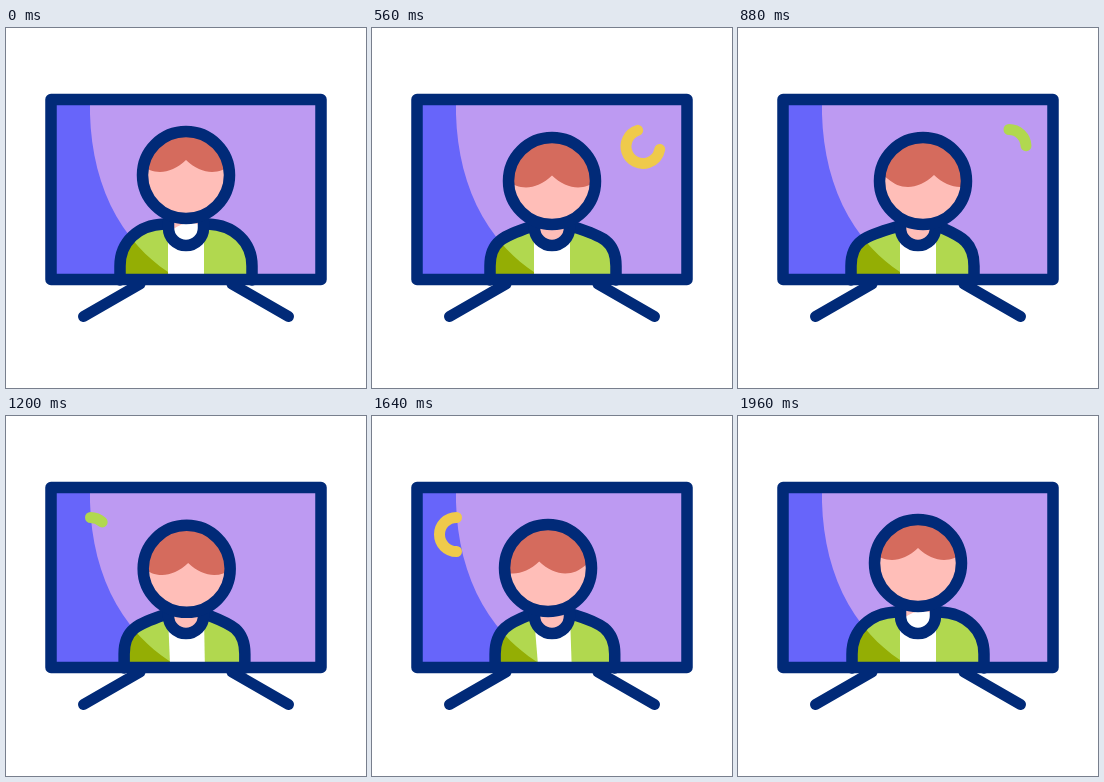
Recreate the animation shown at these times as an HTML page with a canvas. Size 360x360 px, loop 2 s.

```html
<!DOCTYPE html>
<html lang="en">
<head>
<meta charset="utf-8">
<title>Presenter on a screen</title>
<style>
html, body { margin: 0; width: 100%; height: 100%; overflow: hidden; background: #fff; }
canvas { display: block; }
</style>
</head>
<body>
<canvas id="stage" width="360" height="360"></canvas>
<script>
const ctx = document.getElementById('stage').getContext('2d');
const NAVY = '#012a78', SKIN = '#ffbeb8', HAIR = '#d56b5d';
const LIME = '#b1d84f', OLIVE = '#94ae04', YELLOW = '#efca4b';
const LOOP = 2000, STEP = 40, TAU = Math.PI * 2;

// Pose keys: rest, nod, hold, lean right, lean left, rest
const TIMES = [140, 340, 560, 880, 1560, 1920];
const KEYS = {
  headX: [180, 180, 180, 185, 175.5, 180],
  headY: [147, 153, 153, 153, 152.7, 147],
  hairX: [0, 0, 0, 11, -10, 0],
  hairY: [-15, -5.5, -5.5, -6, -5.5, -15],
  left: [114, 118, 118, 113, 124.3, 114],
  right: [246, 244, 244, 236, 242.3, 246],
  sag: [0, 1, 1, 1, 1, 0],
  shirt: [0, 0, 0, 0, 4, 0]
};

const clamp = x => Math.min(1, Math.max(0, x));
const mix = (a, b, k) => a + (b - a) * k;
const ramp = (t, from, to) => clamp((t - from) / (to - from));

function poseAt(t) {
  let i = 0;
  while (i < TIMES.length - 2 && t >= TIMES[i + 1]) i++;
  const k = (1 - Math.cos(Math.PI * ramp(t, TIMES[i], TIMES[i + 1]))) / 2;
  const pose = {};
  for (const name in KEYS) pose[name] = mix(KEYS[name][i], KEYS[name][i + 1], k);
  return pose;
}

function fill(d, color) {
  ctx.fillStyle = color;
  ctx.fill(new Path2D(d));
}

function stroke(d, color = NAVY, width = 11.5) {
  ctx.strokeStyle = color;
  ctx.lineWidth = width;
  ctx.stroke(new Path2D(d));
}

function clipped(d, draw) {
  ctx.save();
  ctx.clip(new Path2D(d));
  draw();
  ctx.restore();
}

// Ring segment between two turn fractions, starting at the top
function ring(x, start, end, dir, color) {
  if (end <= start) return;
  const angle = f => -Math.PI / 2 + dir * f * TAU;
  ctx.beginPath();
  ctx.arc(x, 118.5, 17, angle(start), angle(end), dir < 0);
  ctx.strokeStyle = color;
  ctx.lineWidth = 11;
  ctx.stroke();
}

function shoulder(edge, side, sag) {
  const inner = 180 + side * 22;
  return `M${edge} 252V238C${edge} ${214 - sag} ${edge - side * mix(18, 14, sag)} ` +
    `${mix(197, 208, sag)} ${inner} ${mix(196, 199, sag)}`;
}

const SHADE = 'M45 71H84C82 150 112 215 170 249V252H45Z';
const COLLAR = 'M162.5 194V200A17.5 17.5 0 0 0 197.5 200V194';

function drawBody(p) {
  const sides = [shoulder(p.left, -1, p.sag), shoulder(p.right, 1, p.sag)];
  const halves = sides.map(d => d + 'H180V252Z');
  for (const d of halves) fill(d, LIME);
  clipped(halves[0], () => fill(SHADE, OLIVE));
  fill(`M162 200H198L${198 + p.shirt * .5} 252H${162 + p.shirt * 1.2}Z`, '#fff');
  fill(COLLAR + 'Z', p.sag < .3 ? '#fff' : SKIN);
  if (p.sag < .3) fill('M166 190H194V197Q180 191 166 202Z', SKIN);
  for (const d of sides) stroke(d);
  stroke(COLLAR);
}

function drawHead(p) {
  const circle = 'M-43.5 0A43.5 43.5 0 0 1 43.5 0A43.5 43.5 0 0 1 -43.5 0Z';
  ctx.save();
  ctx.translate(p.headX, p.headY);
  fill(circle, SKIN);
  clipped(circle, () => {
    const lock = s => `M${p.hairX} ${p.hairY}c${8 * s} 8 ${18 * s} 12 ${26 * s} 12` +
      `s${14 * s} -3 ${20 * s} -8l${20 * s} -15V-50H${p.hairX}Z`;
    fill(lock(-1) + lock(1), HAIR);
  });
  stroke(circle);
  ctx.restore();
}

function draw(t) {
  const pose = poseAt(t);
  ctx.clearRect(0, 0, 360, 360);
  ctx.lineCap = ctx.lineJoin = 'round';
  stroke('M134 256L77.5 288.5M226 256L282.5 288.5', NAVY, 11);
  fill('M45 71H315V252H45Z', '#bd9af2');
  fill(SHADE, '#6765fa');

  const tint = t >= 800 && t < 1280 ? LIME : YELLOW;
  ring(271, ramp(t, 537, 990), ramp(t, 195, 700), -1, tint);
  ring(84.5, ramp(t, 1400, 1880), ramp(t, 1140, 1640), 1, tint);

  drawBody(pose);
  drawHead(pose);
  stroke('M45 71.5H315V251.5H45Z');
}

const began = performance.now();
function tick() {
  const t = (performance.now() - began) % LOOP;
  draw(Math.floor(t / STEP) * STEP);
  requestAnimationFrame(tick);
}
tick();
</script>
</body>
</html>
```
